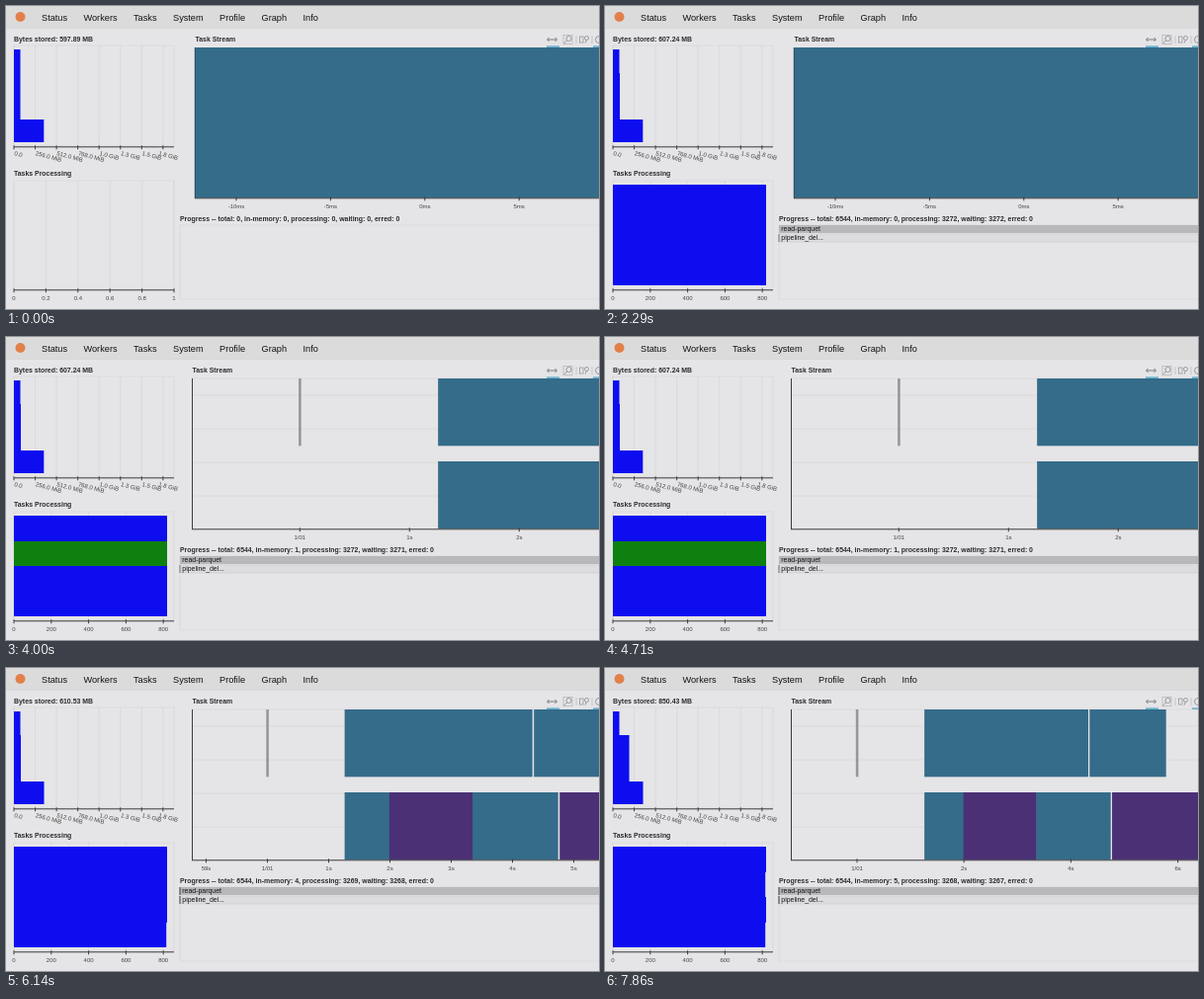
Recreate the animation shown at these times as an HTML page with a canvas. Size 600x307 px, loop 8000 ms.

```html
<!DOCTYPE html>
<html lang="en">
<head>
<meta charset="utf-8">
<title>Cluster dashboard</title>
<style>
  html, body { margin: 0; height: 100%; overflow: hidden; background: #e5e4e6; }
  canvas { display: block; width: 100vw; height: 100vh; }
</style>
</head>
<body>
<canvas id="stage" width="600" height="307"></canvas>
<script>
const ctx = document.getElementById('stage').getContext('2d');
const LOOP = 8000;
const PAGE = '#e5e4e6', GRID = '#d8d7d9', INK = '#2b2b2d', AXIS = '#3c3c3e', BAR = '#0d0df0';
const READ = '#346c8a', WRITE = '#4b3076', GREEN = '#0d800f';

// Dashboard updates. bytes: bar widths per worker; notch: shortened rows in the task chart.
const updates = [
  { at: 0, stored: '597.89', bytes: [6.5, 6.5, 6.5, 30.3], counts: [0, 0, 0, 0] },
  { at: 1710, stored: '607.24', bytes: [6.5, 7, 7, 30.3], counts: [6544, 0, 3272, 3272] },
  { at: 3140, stored: '607.24', bytes: [6.5, 7, 7, 30.3], counts: [6544, 0, 3272, 3272], green: true },
  { at: 3710, stored: '607.24', bytes: [6.5, 7, 7, 30.3], counts: [6544, 1, 3272, 3271], green: true,
    stream: { zero: 297.3, scale: 111, ticks: { 0: '1/01', 1: '1s', 2: '2s' } } },
  { at: 4860, stored: '609.17', bytes: [6.5, 7, 7, 30.5], counts: [6544, 3, 3270, 3269], notch: [3], spill: 1,
    stream: { zero: 292, scale: 84, ticks: { '-1': '58s', 0: '1/01', 1: '1s', 2: '2s', 3: '3s' } } },
  { at: 6000, stored: '610.53', bytes: [6.5, 7, 7, 30.5], counts: [6544, 4, 3269, 3268], notch: [3], spill: 2,
    stream: { zero: 264.5, scale: 62, ticks: { '-1': '59s', 0: '1/01', 1: '1s', 2: '2s', 3: '3s', 4: '4s', 5: '5s' } } },
  { at: 7140, stored: '850.43', bytes: [6.5, 16.5, 16.5, 30.5], counts: [6544, 5, 3268, 3267], notch: [1, 3], spill: 2,
    stream: { zero: 255, scale: 54.1, ticks: { 0: '1/01', 2: '2s', 4: '4s', 6: '6s' } } },
];

function rect(x, y, w, h, color) {
  ctx.fillStyle = color;
  ctx.fillRect(x, y, w, h);
}

function frame(x, y, w, h, color = GRID) {
  ctx.strokeStyle = color;
  ctx.lineWidth = 0.8;
  ctx.strokeRect(x, y, w, h);
}

function line(x1, y1, x2, y2, color = AXIS, width = 1) {
  ctx.strokeStyle = color;
  ctx.lineWidth = width;
  ctx.beginPath();
  ctx.moveTo(x1, y1);
  ctx.lineTo(x2, y2);
  ctx.stroke();
}

function text(str, x, y, size = 6.93, weight = 'normal', align = 'left', color = INK) {
  ctx.font = `${weight} ${size}px "Liberation Sans", Arial, sans-serif`;
  ctx.textAlign = align;
  ctx.fillStyle = color;
  ctx.fillText(str, x, y);
}

const heading = (str, x, y) => text(str, x, y, 6.93, 'bold');
const gridColumn = (x, top, bottom) => line(x, top, x, bottom, GRID, 0.8);

// Horizontal bars share whole-pixel edges so that no seam shows between them.
function rowBar(i, top, pitch, width, color) {
  const y = Math.round(top + i * pitch);
  rect(8, y, width, Math.round(top + (i + 1) * pitch) - y, color);
}

function tick(x, y, label) {
  line(x, y - 1.5, x, y + 2.5);
  if (label) text(label, x, y + 10.5, 6, 'normal', 'center', '#444');
}

function drawHeader() {
  rect(0, 0, 600, 22, '#dcdbdc');
  rect(0, 22, 600, 1, '#d8d7d9');
  ctx.fillStyle = '#e2804a';
  ctx.beginPath();
  ctx.arc(14.5, 11, 5, 0, 7);
  ctx.fill();
  const menu = { Status: 36, Workers: 78.5, Tasks: 129, System: 169, Profile: 216, Graph: 258.5, Info: 300.5 };
  for (const name in menu) text(name, menu[name], 14.7, 9.2, 'normal', 'left', '#111');
}

function drawToolbar() {
  const gray = '#98979a', blue = '#3f9fc8';
  line(548, 34, 557, 34, '#777b80');
  for (const [x, d] of [[547.5, 2], [557.5, -2]]) {
    line(x, 34, x + d, 32, '#777b80');
    line(x, 34, x + d, 36, '#777b80');
  }
  rect(547, 40.5, 13, 1.2, blue);
  rect(594, 40.5, 6, 1.2, blue);
  frame(564, 29.5, 9, 9, '#b8b7b9');
  ctx.strokeStyle = gray;
  ctx.lineWidth = 1;
  ctx.beginPath();
  ctx.arc(569.5, 33, 2.6, 0, 7);
  ctx.moveTo(567.5, 35);
  ctx.lineTo(564.5, 38);
  ctx.moveTo(589.5, 32.5);
  ctx.arc(587.5, 32.5, 2, 0, 7);
  ctx.moveTo(587.5, 34.5);
  ctx.lineTo(586, 37.5);
  ctx.moveTo(603.5, 34);
  ctx.arc(600, 34, 3.5, 0, 7);
  ctx.stroke();
  frame(580.5, 31, 3.5, 6, gray);
  line(577, 30, 577, 38, '#c5c4c6');
  line(593, 30, 593, 38, '#c5c4c6');
}

function drawBytes({ stored, bytes }) {
  heading(`Bytes stored: ${stored} MB`, 8, 36);
  frame(8, 40, 162, 102);
  const labels = ['0.0', '256.0 MiB', '512.0 MiB', '768.0 MiB', '1.0 GiB', '1.3 GiB', '1.5 GiB', '1.8 GiB'];
  labels.forEach((label, i) => {
    const x = 8 + i * 21.55;
    gridColumn(x, 40, 142);
    tick(x, 142.8);
    ctx.save();
    ctx.translate(Math.min(x, 154), 151);
    ctx.rotate(0.26);
    text(label, 0, 0, 6, 'normal', 'left', '#444');
    ctx.restore();
  });
  bytes.forEach((w, i) => rowBar(i, 44, 23.5, w, BAR));
  line(8, 142.8, 170, 142.8);
}

function drawProcessing({ counts, green, notch = [] }) {
  heading('Tasks Processing', 8, 172);
  frame(8, 177, 162, 110);
  const busy = counts[0] > 0;
  const labels = busy ? [0, 200, 400, 600, 800] : [0, 0.2, 0.4, 0.6, 0.8, 1];
  labels.forEach((label, i) => {
    const x = 8 + i * (busy ? 37.8 : 32.4);
    gridColumn(x, 177, 287);
    tick(x, 287.8, String(label));
  });
  if (busy) {
    for (let i = 0; i < 4; i++) {
      rowBar(i, 181.3, 25.5, notch.includes(i) ? 154.2 : 155, green && i === 1 ? GREEN : BAR);
    }
  }
  line(8, 287.8, 170, 287.8);
}

function drawStream({ at, stream, spill = 0 }) {
  if (at < 3140) {
    heading('Task Stream', 191.5, 36);
    rect(191, 42, 409, 152.5, READ);
    ['-10ms', '-5ms', '0ms', '5ms'].forEach((label, i) => tick(233 + i * 95.4, 194.8, label));
    line(191.3, 42, 191.3, 195, '#284f62');
    line(191, 194.8, 600, 194.8);
    return;
  }
  if (!stream) {
    heading('Task Stream', 176, 36);
    frame(176, 42, 440, 164);
    return;
  }

  const { zero, scale, ticks } = stream;
  const task = (row, from, to, color) =>
    rect(zero + from * scale, row ? 126 : 42, (to - from) * scale, 68.3, color);

  heading('Task Stream', 188.5, 36);
  frame(188.5, 42, 440, 152.5);
  for (const y of [59, 93, 127, 161]) line(188, y, 600, y, GRID, 0.8);

  rect(zero - 1.2, 42, 2.6, 68.3, '#979698');
  task(0, 1.26, 4.325, READ);
  task(0, 4.35, 5.78, READ);
  task(1, 1.26, 3.35, READ);
  if (spill) task(1, 1.99, 3.36, WRITE);
  if (spill > 1) {
    task(1, 3.35, 4.745, READ);
    task(1, 4.77, 8, WRITE);
  }

  for (const s in ticks) tick(zero + s * scale, 194.8, ticks[s]);
  line(188.5, 42, 188.5, 195);
  line(188, 194.8, 600, 194.8);
}

function drawProgress({ counts: [total, memory, processing, waiting] }) {
  heading(`Progress -- total: ${total}, in-memory: ${memory}, processing: ${processing}, ` +
    `waiting: ${waiting}, erred: 0`, 176, 217.7);
  frame(176, 222, 440, 75);
  if (!total) return;
  rect(176, 222, 424, 8, '#b8b7b9');
  rect(176, 231, 424, 8, '#dddcde');
  frame(176, 231, 440, 8, '#cfced0');
  text('read-parquet', 178.3, 228.3, 6.93, 'normal', 'left', '#111');
  text('pipeline_del...', 178.3, 237.3, 6.93, 'normal', 'left', '#111');
  if (memory > 1) line(176, 222, 176, 230);
  line(176, 231, 176, 239, memory > 1 ? AXIS : '#777');
}

function draw(now) {
  const time = now % LOOP;
  const state = updates.filter(u => u.at <= time).pop();
  rect(0, 0, 600, 307, PAGE);
  drawHeader();
  drawBytes(state);
  drawProcessing(state);
  drawStream(state);
  drawToolbar();
  drawProgress(state);
}

const start = performance.now();
function loop() {
  draw(performance.now() - start);
  requestAnimationFrame(loop);
}
loop();
</script>
</body>
</html>
```
